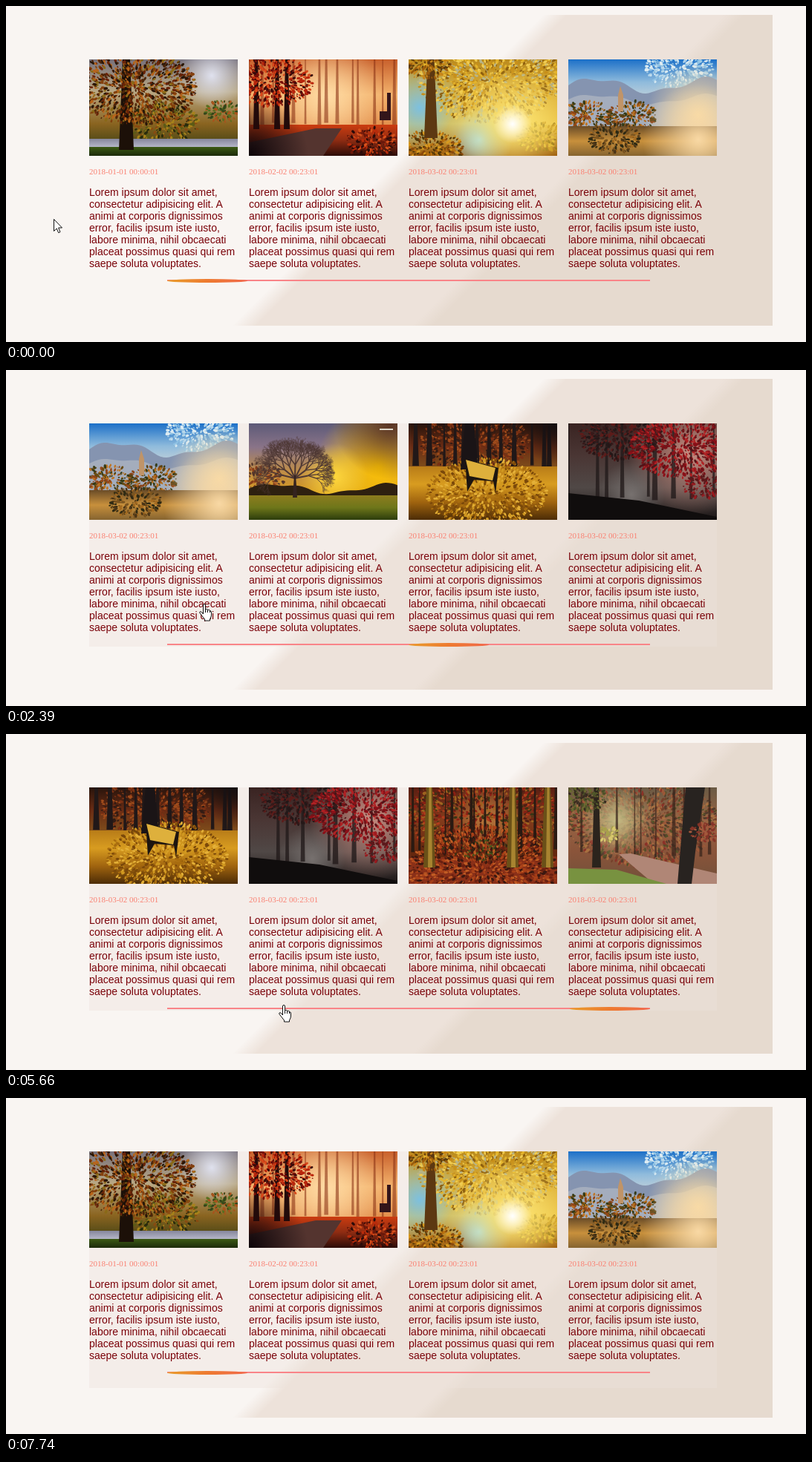
Recreate the animation shown at these times as an HTML page with a canvas. Size 1077 px wide and 453 px high, loop 8610 ms.

```html
<!DOCTYPE html>
<html lang="en">
<head>
<meta charset="utf-8">
<title>Autumn carousel</title>
<style>
html, body { margin: 0; width: 100%; height: 100%; overflow: hidden; background: #f9f5f2; }
canvas, svg, .card { position: absolute; left: 0; top: 0; }
.card { width: 200px; white-space: pre; }
time, p { position: absolute; left: 0; margin: 0; }
time { top: 217px; font: 11px/13px "Liberation Serif", "Times New Roman", serif; color: #fa8072; }
p { top: 243px; font: 14px/16px "Liberation Sans", Arial, sans-serif; color: #7a0008; }
svg { overflow: visible; }
</style>
</head>
<body>
<canvas id="stage" width="1077" height="453"></canvas>
<div id="cards"></div>
<svg id="cursor" width="20" height="25" fill="#fff" stroke="#111" stroke-linejoin="round">
  <path id="arrow" d="M.5 .5V16.5L4.2 13 6.7 18.7 9 17.7 6.6 12H11.5Z"/>
  <g id="hand" transform="translate(-6)">
    <path d="M5.5 14V2q0-1.5 1.5-1.5T8.5 2V8q3-2 3 1 3-2 3 1 2-1 2 2v3q0 2-1 4l-1 2v2H7.5v-2L2 14q-2-2-1-3 1-1 3 1z"/>
    <path fill="none" d="M8.5 8v4M11.500 9v3M14.500 10v2"/>
  </g>
</svg>
<script>
const LOOP = 8610, STEP = 60, W = 200, H = 130, GAP = 215, LEFT = 112;
const $ = id => document.getElementById(id);
const ctx = $('stage').getContext('2d');

const TEXT = `Lorem ipsum dolor sit amet,
consectetur adipisicing elit. A
animi at corporis dignissimos
error, facilis ipsum iste iusto,
labore minima, nihil obcaecati
placeat possimus quasi qui rem
saepe soluta voluptates.`;

function addStops(g, colors) {
  colors.forEach((k, i) => g.addColorStop(i / (colors.length - 1), k));
  return g;
}

// Landscape brushes with their own seeded randomness.
function brushes(c, seed) {
  const rnd = () => (seed = seed * 16807 % 2147483647) / 2147483647;
  const shape = (color, ...p) => {
    c.fillStyle = color;
    c.beginPath();
    for (let i = 0; i < p.length; i += 2) c.lineTo(p[i], p[i + 1]);
    c.fill();
  };
  const wash = (top, bottom, ...colors) => {
    c.fillStyle = addStops(c.createLinearGradient(0, top, 0, bottom), colors);
    c.fillRect(0, top, W, bottom - top);
  };
  const glow = (x, y, r, color) => {
    c.fillStyle = addStops(c.createRadialGradient(x, y, 0, x, y, r), [color, color + '00']);
    c.fillRect(x - r, y - r, 2 * r, 2 * r);
  };
  const leaves = (x, y, r, ...colors) => {
    for (let n = r * r / 3; n > 0; n--) {
      const a = rnd() * 2 * Math.PI, d = r * Math.sqrt(rnd()), size = 1 + rnd() * 2;
      c.fillStyle = colors[Math.floor(rnd() * colors.length)];
      c.beginPath();
      c.ellipse(x + Math.cos(a) * d * 1.35, y + Math.sin(a) * d * .8, size, size * .6, a, 0, 2 * Math.PI);
      c.fill();
    }
  };
  const trunk = (x, base, w, color) => shape(color, x - w / 2, base, x - w / 4, 0, x + w / 4, 0, x + w / 2, base);
  const woods = (n, base, w, color) => {
    for (let i = 0; i < n; i++) trunk((i + rnd()) * W / n, base - rnd() * 8, w * (.5 + rnd()), color);
  };
  const ridge = (y, h, color) => {
    const p = [0, H];
    for (let x = 0; x <= W; x += 4) p.push(x, y - h * (Math.sin(x / 24) + Math.sin(x / 9) / 3));
    shape(color, ...p, W, H);
  };
  const branch = (x, y, len, dir, color) => {
    if (len < 2.5) return;
    const x2 = x + Math.cos(dir) * len, y2 = y + Math.sin(dir) * len;
    c.strokeStyle = color;
    c.lineWidth = len / 9;
    c.beginPath();
    c.moveTo(x, y);
    c.lineTo(x2, y2);
    c.stroke();
    for (const turn of [-.5, 0, .5]) branch(x2, y2, len * (.6 + rnd() * .18), dir + turn + rnd() * .3 - .15, color);
  };
  return { shape, wash, glow, leaves, trunk, woods, ridge, branch };
}

const scenes = [
  // Park tree by a river
  b => {
    b.wash(0, H, '#77717c', '#b9a884', '#8a6420', '#263510');
    b.glow(165, 22, 45, '#dfe1ee');
    b.leaves(100, 86, 35, '#a8831a', '#5c5b16', '#8a4a10', '#2a2c0c');
    b.wash(107, 119, '#85869c', '#b9bacb');
    b.leaves(180, 70, 18, '#587020', '#33451a', '#a8531c');
    b.wash(118, H, '#3c5a14', '#1c2a0a');
    b.trunk(50, 122, 20, '#1c1008');
    b.leaves(62, 38, 62, '#84400c', '#b8641a', '#4e260a', '#8a6a18', '#281608', '#6a2408');
  },
  // Misty red avenue
  b => {
    b.wash(0, 95, '#c8602c', '#f3b26c', '#e08a48');
    b.glow(105, 50, 80, '#ffdca5');
    b.woods(14, 92, 4, 'rgba(140,52,22,.6)');
    b.wash(88, H, '#cc3c10', '#8e2c12', '#2c0c08');
    b.shape('#54342f', 0, 112, 90, 93, 125, 93, 100, H, 0, H);
    b.glow(0, H, 80, '#0c0408');
    b.leaves(165, 112, 26, '#b82c0c', '#6a180a', '#d8521c', '#2c0c0a');
    for (const x of [10, 38, 51]) b.trunk(x, 94, 8, '#220a0a');
    b.leaves(30, 30, 42, '#7a0f08', '#b8240c', '#3a0a0a', '#d8481a');
    b.shape('#33151a', 176, 82, 176, 70, 186, 70, 186, 45, 191, 45, 191, 82);
  },
  // Golden tree and low sun
  b => {
    b.wash(0, H, '#b98a1e', '#dcb03a', '#ecc446', '#9c5c0e');
    b.glow(15, 65, 60, '#7cc0e0');
    b.leaves(110, 28, 72, '#c8901a', '#e4b42c', '#8f600f', '#f0cc52', '#b8b488');
    b.glow(95, 108, 45, '#a6daea');
    b.leaves(180, 105, 26, '#c8941a', '#e0b42c', '#94700f');
    b.glow(140, 87, 75, '#ffe97a');
    b.glow(140, 87, 26, '#ffffff');
    b.leaves(30, 120, 32, '#b8700f', '#8a4a0c', '#d89a20', '#543808');
    b.trunk(30, 106, 18, '#5c3812');
    b.leaves(22, 6, 26, '#9c5c0c', '#c8861a', '#5c3c0c');
  },
  // Lake with a church
  b => {
    b.wash(0, 92, '#1c70c8', '#8fbbdc', '#d5d9d8', '#f3d6a0');
    b.leaves(150, 12, 34, '#dcebf2', '#b5d6ea', '#8fc2e4');
    b.ridge(35, 9, '#8594b0');
    b.ridge(54, 6, '#a4adbd');
    b.glow(175, 75, 70, '#f8dca8');
    b.leaves(25, 76, 25, '#c07420', '#6a4c14', '#94481a', '#343a16');
    b.leaves(85, 76, 25, '#b46c1c', '#5c4414', '#8a4418', '#343a16');
    b.shape('#c09468', 67, 70, 67, 48, 70, 36, 74, 48, 74, 70);
    b.wash(90, H, '#6a4c28', '#c8903c', '#866430');
    b.glow(175, 108, 75, '#f8d8a4');
    b.leaves(62, 106, 26, '#4a3416', '#a46a20', '#2e2a14', '#7a5420');
  },
  // Bare tree under a storm sky
  b => {
    b.wash(0, 97, '#5d5a78', '#8a7488', '#c08e48', '#d89c1c');
    b.glow(175, 58, 85, '#ffc400');
    b.glow(115, 72, 45, '#ffd83c');
    b.glow(190, 0, 75, '#5a3424');
    b.leaves(10, 76, 28, '#8a3e18', '#b4662c', '#54362a');
    b.ridge(88, 6, '#2e2010');
    b.wash(97, H, '#8d7c1e', '#6e761a', '#2c3c0c');
    b.trunk(62, 100, 5, '#34231f00');
    for (let dir = -2.9; dir < 0; dir += .45) b.branch(62, 74, 18, dir, '#4e3834');
    b.shape('#34231f', 59, 100, 61, 70, 63, 70, 65, 100);
    b.shape('#ded7c9', 176, 7, 194, 7, 194, 9, 176, 9);
  },
  // Bench in the sun
  b => {
    b.wash(0, 62, '#28140c', '#6a2c14', '#80501c');
    b.leaves(90, 28, 55, '#7a3014', '#a04c1c', '#341c14');
    b.woods(14, 64, 6, '#211818');
    b.wash(58, H, '#b87c18', '#d89c20', '#a0640f', '#4c2c06');
    b.leaves(105, 95, 60, '#d09820', '#a86c0f', '#e4b038', '#7a480a');
    b.trunk(82, 62, 24, '#1a1416');
    b.glow(200, 0, 55, '#140e10');
    b.shape('#1c1510', 76, 48, 121, 60, 117, 94, 114, 78, 88, 76, 79, 92);
    b.shape('#deb03c', 77, 49, 117, 60, 113, 77, 82, 71);
  },
  // Red leaves in dark fog
  b => {
    b.wash(0, H, '#3a2422', '#4a3634', '#504846', '#1c1616');
    b.glow(165, 40, 85, '#c88c80');
    b.glow(85, 96, 45, '#77716f');
    b.woods(9, 105, 6, 'rgba(34,26,26,.8)');
    b.leaves(70, 16, 42, '#371a1a', '#5c1c1a', '#241818');
    b.leaves(152, 32, 52, '#8a1018', '#b02224', '#541418', '#741418');
    b.leaves(182, 85, 20, '#99191e', '#5c191b');
    b.shape('#100d0d', 0, 94, 95, 104, W, 126, W, H, 0, H);
  },
  // Red forest
  b => {
    b.wash(0, H, '#5a1e12', '#843c1c', '#64280f', '#6a200e');
    b.glow(105, 43, 55, '#b8783c');
    b.leaves(100, 38, 76, '#8a2014', '#b03c1c', '#501f14', '#a06420', '#3c3414');
    b.woods(16, 90, 4, '#2a1a12');
    b.leaves(100, 86, 20, '#4a561c', '#2a3014');
    b.ridge(96, 3, '#8a3018');
    b.leaves(100, 112, 74, '#a84018', '#6a2010', '#c05c24', '#3c1810');
    for (const x of [28, 140, 187]) {
      b.trunk(x, 108, 16, '#6a5018');
      b.trunk(x + 1, 108, 6, '#a88430');
    }
  },
  // Path through the park
  b => {
    b.wash(0, H, '#6a5a44', '#986444', '#8a543a', '#70503a');
    b.leaves(100, 45, 76, '#74402a', '#9c5838', '#543c2c', '#8a3228', '#a87040', '#545028');
    b.glow(65, 45, 50, '#c4bc84');
    b.woods(11, 95, 4, 'rgba(58,38,28,.75)');
    b.leaves(52, 64, 13, '#d8c86e', '#a8a04c');
    b.shape('#b08676', 68, 90, 84, 89, W, 116, W, H, 115, H);
    b.shape('#789240', 0, 109, 65, 111, 132, H, 0, H);
    b.trunk(38, 108, 12, '#2b241d');
    b.leaves(20, 14, 24, '#4c5228', '#68682f', '#382c20');
    b.shape('#282320', 158, 0, 184, 0, 171, 87, 166, H, 147, H);
    b.leaves(186, 60, 16, '#843428', '#a4583c');
  }
];

const photos = scenes.map((paint, i) => {
  const el = document.createElement('canvas');
  el.width = W;
  el.height = H;
  paint(brushes(el.getContext('2d'), 971 + i * 353));
  return el;
});

const dates = [0, 1, 2, 3].map(i => {
  const card = document.createElement('div'), date = document.createElement('time'), p = document.createElement('p');
  card.className = 'card';
  card.style.left = LEFT + i * GAP + 'px';
  p.textContent = TEXT;
  card.append(date, p);
  $('cards').append(card);
  return date;
});

const NEXT = [650, 1390, 2390, 3000, 3690];
const REWIND = 5840, REWIND_STEP = 300;

function position(t) {
  const back = Math.floor((t - REWIND) / REWIND_STEP) + 1;
  return NEXT.filter(k => k <= t).length - Math.max(0, Math.min(5, back));
}

// Pointer moves: start, end, x, y, easing power
const MOVES = [
  [60, 600, 266, 315, 1],
  [4060, 5060, 277, 394, 1],
  [5310, 5660, 373, 365, 1],
  [5660, 6920, 433, 368, 1],
  [7080, 7680, 854, 445, 5]
];
const GONE = 7740;

function tip(t) {
  let x = 64, y = 287;
  for (const [from, to, toX, toY, power] of MOVES) {
    if (t < from) break;
    const u = t >= to ? 1 : (Math.floor((t - from) / STEP) * STEP / (to - from)) ** power;
    x += (toX - x) * u;
    y += (toY - y) * u;
  }
  return [Math.round(x), Math.round(y)];
}

// Bands run along x + y = const.
const bands = ctx.createLinearGradient(0, 0, 600, 600);
for (const [sum, color] of [[735, '#f9f5f2'], [768, '#ede2da'], [978, '#ede2da'], [1006, '#e6dacf']])
  bands.addColorStop(sum / 1200, color);

function drawBackground(t) {
  ctx.fillStyle = '#f9f5f2';
  ctx.fillRect(0, 0, 1077, 453);
  ctx.fillStyle = bands;
  ctx.fillRect(0, 12, 1032, 419);
  if (t < NEXT[0]) return;
  ctx.fillStyle = 'rgba(236,225,218,.4)';
  ctx.fillRect(LEFT, 72, 845, t < REWIND + 2 * REWIND_STEP ? 301 : 319);
}

function drawSlider(pos) {
  const w = 650 / 6, x = 217 + pos * w;
  ctx.fillStyle = '#f98488';
  ctx.fillRect(217, 369, 650, 2);
  ctx.fillStyle = addStops(ctx.createLinearGradient(x, 0, x + w, 0), ['#e89c2a', '#ee7a30', '#f0684a']);
  ctx.beginPath();
  ctx.ellipse(x + w / 2, 370.5, w / 2, 2.5, 0, 0, 2 * Math.PI);
  ctx.fill();
}

function drawCursor(t) {
  const [x, y] = tip(t), over = x >= LEFT && y < 376;
  $('cursor').style.display = t < GONE ? '' : 'none';
  $('cursor').style.transform = `translate(${x}px, ${y}px)`;
  $('hand').style.display = over ? '' : 'none';
  $('arrow').style.display = over ? 'none' : '';
}

function frame(now) {
  const t = now % LOOP, pos = position(t);
  drawBackground(t);
  dates.forEach((date, i) => {
    const n = pos + i;
    ctx.drawImage(photos[n], LEFT + i * GAP, 72);
    date.textContent = n ? `2018-0${Math.min(n + 1, 3)}-02 00:23:01` : '2018-01-01 00:00:01';
  });
  drawSlider(pos);
  drawCursor(t);
}

const start = performance.now();
(function tick() {
  frame(performance.now() - start);
  requestAnimationFrame(tick);
})();
</script>
</body>
</html>
```
